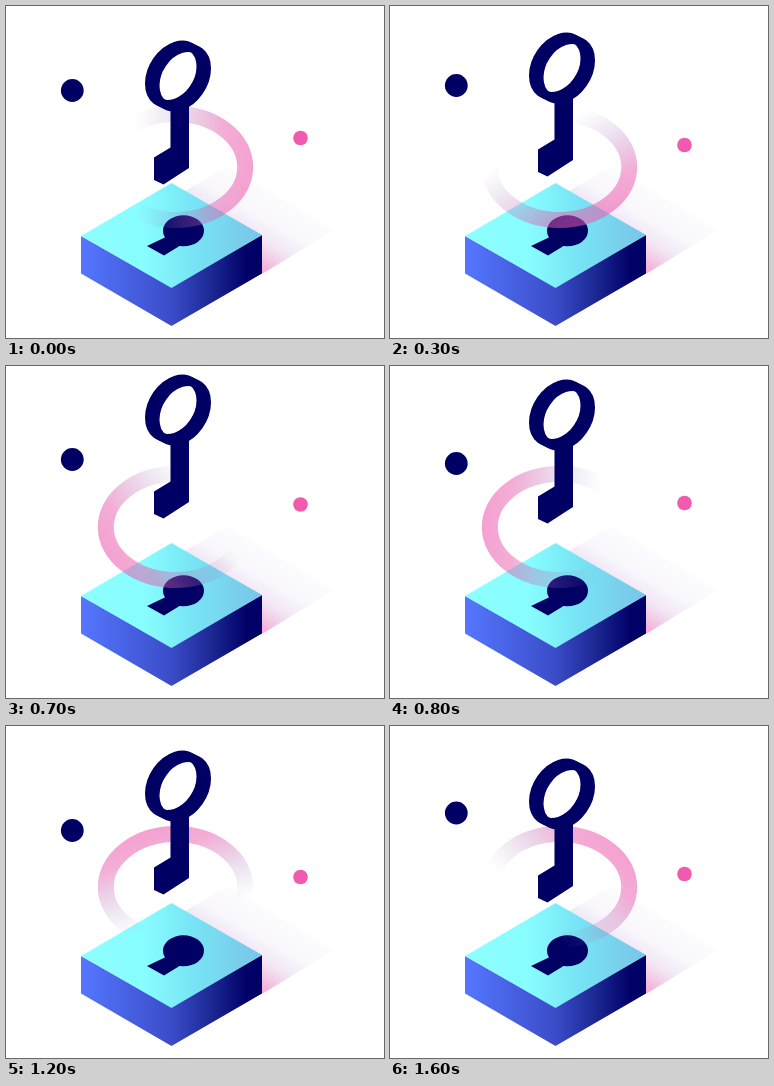
An HTML page for the animation above (1.7 s loop, 378 px wide and 332 px high).

```html
<!DOCTYPE html>
<html lang="en">
<head>
<meta charset="utf-8">
<title>Key and lock</title>
<style>
  html, body { margin: 0; width: 100%; height: 100%; overflow: hidden; background: #fff; }
  svg { display: block; width: 100%; height: 100%; }
</style>
</head>
<body>
<svg viewBox="0 0 378 332">
  <defs>
    <linearGradient id="shade" gradientUnits="userSpaceOnUse" x1="244.8" y1="255.5" x2="281" y2="195.6">
      <stop offset="0" stop-color="#f05aaf" stop-opacity=".48"/>
      <stop offset=".35" stop-color="#be6ebe" stop-opacity=".17"/>
      <stop offset=".6" stop-color="#785abe" stop-opacity=".05"/>
      <stop offset="1" stop-color="#785abe" stop-opacity=".02"/>
    </linearGradient>
    <linearGradient id="top" gradientUnits="userSpaceOnUse" x1="75" y1="0" x2="256" y2="0">
      <stop offset="0" stop-color="#8cffff"/>
      <stop offset=".35" stop-color="#88fdff"/>
      <stop offset=".6" stop-color="#78e6f5"/>
      <stop offset="1" stop-color="#78c4e8"/>
    </linearGradient>
    <linearGradient id="side" gradientUnits="userSpaceOnUse" x1="75" y1="0" x2="256" y2="0">
      <stop offset="0" stop-color="#5577ff"/>
      <stop offset=".5" stop-color="#3a4cc8"/>
      <stop offset=".72" stop-color="#1c2894"/>
      <stop offset=".92" stop-color="#000066"/>
    </linearGradient>
    <linearGradient id="sweep" gradientUnits="userSpaceOnUse">
      <stop offset="0" stop-color="#8c82be" stop-opacity="0"/>
      <stop offset=".3" stop-color="#a873b6" stop-opacity=".18"/>
      <stop offset=".75" stop-color="#e85aaa" stop-opacity=".5"/>
      <stop offset="1" stop-color="#ec5aaf" stop-opacity=".57"/>
    </linearGradient>
    <circle id="loop" r="25.75" transform="matrix(1 -.33 0 1.107 0 0)" fill="none" stroke="#000064" stroke-width="6.5"/>
  </defs>

  <path fill="url(#shade)" d="M165 193L222 160 328 224 256 268 165 268Z"/>
  <path fill="url(#side)" d="M75 230L165.5 281 256 229V267.5L165.5 320 75 267.5Z"/>
  <path fill="url(#top)" d="M165.5 177L256 229 165.5 282 75 230Z"/>
  <g fill="#000064">
    <ellipse cx="177.5" cy="224.8" rx="20.5" ry="15.5"/>
    <path d="M141 240L164 229 180 236 158 249.500Z"/>
  </g>

  <ellipse cx="169.5" cy="161" rx="69.7" ry="53" fill="none" stroke="url(#sweep)" stroke-width="16"/>

  <g id="key">
    <use href="#loop" x="168" y="68"/>
    <use href="#loop" x="172" y="70"/>
    <use href="#loop" x="176" y="72"/>
    <path fill="#000064" d="M164.5 100L183 96V162L157.5 178.5 148 174V151.5L164.5 141.5Z"/>
  </g>
  <circle id="dark" cx="66.3" r="11.4" fill="#000064"/>
  <circle id="pink" cx="294.5" r="7.3" fill="#f05aaf"/>
</svg>
<script>
const get = id => document.getElementById(id);
const set = (el, attrs) => {
  for (const name in attrs) el.setAttribute(name, attrs[name]);
};

// step, key lift, ring angle, dark dot y, pink dot y
const poses = [
  [0, 0, 0, 84.5, 132],
  [3, -8, 58, 79.5, 139],
  [5, -15, 117, 85.5, 143],
  [6, -19, 132, 89.5, 141],
  [7, -26, 149, 93.5, 138.5],
  [8, -21, 182, 97.5, 137],
  [9, -18, 213, 101.5, 135],
  [11, -10, 252, 104.5, 151],
  [12, -8, 270, 102, 154.5],
  [14, -2, 318, 87, 148]
];

function poseAt(step) {
  const i = Math.max(1, poses.findIndex(p => p[0] >= step));
  const a = poses[i - 1], b = poses[i];
  const k = (step - a[0]) / (b[0] - a[0]);
  return a.map((v, j) => v + (b[j] - v) * k);
}

function draw(now) {
  // The picture moves in 100 ms ticks and rests for one tick twice per loop.
  const tick = Math.floor(now % 1700 / 100);
  const step = tick - (tick > 8) - (tick > 12);
  const [, lift, angle, dark, pink] = poseAt(step);

  const rad = angle * Math.PI / 180;
  const c = Math.cos(rad), s = Math.sin(rad);
  const reach = Math.hypot(77.7 * c, 61 * s);
  set(get('sweep'), {
    x1: 169.5 - c * reach * .52, y1: 161 - s * reach * .52,
    x2: 169.5 + c * reach, y2: 161 + s * reach
  });
  set(get('key'), { transform: `translate(0 ${lift})` });
  set(get('dark'), { cy: dark });
  set(get('pink'), { cy: pink });
}

const start = performance.now();
function loop() {
  draw(performance.now() - start);
  requestAnimationFrame(loop);
}
loop();
</script>
</body>
</html>
```
